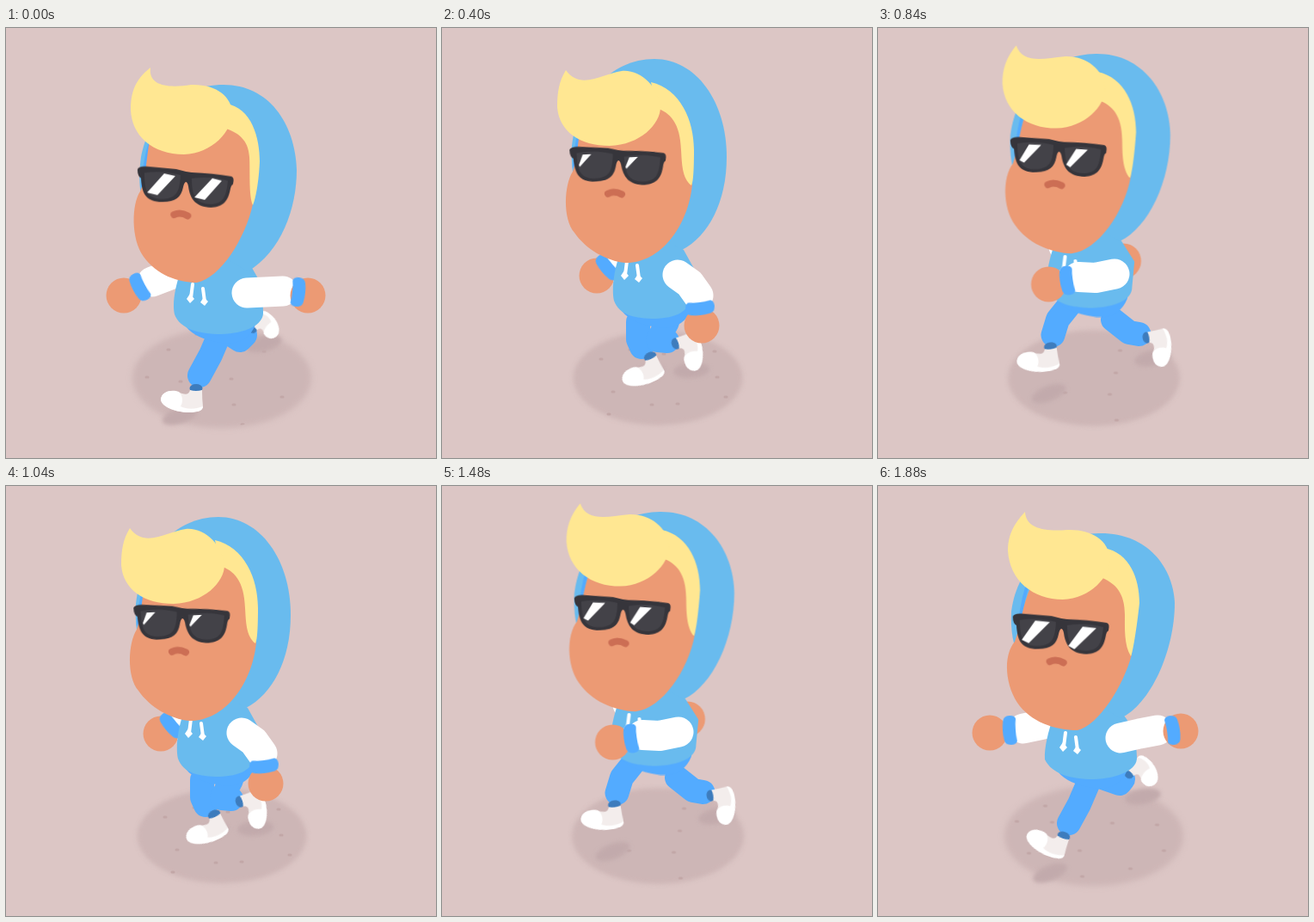
Write an HTML page without scripts that moves like this. It is 500 px wide and 500 px high and loops after 1.92 s.

```html
<!DOCTYPE html>
<html lang="en">
<head>
<meta charset="utf-8">
<title>Runner</title>
<style>
html, body { margin: 0; width: 100%; height: 100%; overflow: hidden; background: #dcc6c5; }
svg { display: block; width: 100vw; height: 100vh; }

/* A stride is two steps; poses advance at 25 per second. */
.stride { animation: .64s steps(2) infinite; }
.step { animation: .32s steps(2) infinite; }
.far .stride { animation-delay: -.32s; }

.hood, .torso { fill: #69bbee; }
.skin { fill: #ec9a74; }
.hair { fill: #ffe792; }
.blue { fill: #53abff; }
.white { fill: #fff; }
.line { fill: none; stroke-linecap: round; stroke-linejoin: round; }
.leg { stroke: #53abff; stroke-width: 28; animation-name: leg; }
.sleeve { stroke: #fff; stroke-width: 35; animation-name: sleeve; }
.shoe { animation-name: shoe; }
.cuff { animation-name: cuff; }
.hand { animation-name: hand; }
.shade { fill: #c2aaac; animation-name: shade; }

.dust { animation: dust .32s steps(8) infinite; }
.ground { transform-origin: 251px 407px; animation-name: ground; }
.body { animation-name: body; }
.head { animation-name: head; }
.torso { animation-name: torso; }
.strings { animation-name: strings; }
.hood { animation-name: hood; }
.face { animation-name: face; }
.side { animation-name: side; }
.quiff { animation-name: quiff; }
.features { transform-origin: 210px 180px; animation-name: features; }
.glint { animation-name: glint; }

@keyframes dust { to { transform: translate(220px, -128px); } }
@keyframes ground {
  0%, 100% { transform: scale(1); }
  25% { transform: scale(.945); }
  50% { transform: scale(.94); }
  75% { transform: scale(.98); animation-timing-function: steps(1); }
  87.5% { transform: scale(1); animation-timing-function: steps(1); }
}
@keyframes body {
  0%, 100% { transform: translate(0, 0); }
  25% { transform: translate(0, -18px); }
  50% { transform: translate(0, -33px); }
  75% { transform: translate(0, -28px); animation-timing-function: steps(1); }
  87.5% { transform: translate(0, -15px); animation-timing-function: steps(1); }
}
@keyframes head {
  0%, 100% { transform: translate(0, 0); }
  25% { transform: translate(-5px, -23px); }
  50% { transform: translate(-1px, -38px); }
  75% { transform: translate(4px, -32px); animation-timing-function: steps(1); }
  87.5% { transform: translate(5px, -14px); animation-timing-function: steps(1); }
}
@keyframes strings {
  0%, 100% { transform: translate(0, 0); }
  25% { transform: translate(-2px, -27px); }
  50% { transform: translate(0, -36px); }
  75% { transform: translate(1px, -28px); animation-timing-function: steps(1); }
  87.5% { transform: translate(1px, -11px); animation-timing-function: steps(1); }
}
@keyframes torso {
  0%, 100% { d: path("M203,283 C197,300 193,320 196,333 C202,350 225,356 250,356 C280,355 300,345 299,330 L298,300 L285,277 L240,250 Z"); }
  25% { d: path("M206,283 C200,300 197,322 200,335 C206,352 225,356 248,356 C272,355 286,348 287,335 L297,305 L281,276 L240,250 Z"); animation-timing-function: steps(5); }
  87.5% { d: path("M204,283 C198,300 193,320 194,333 C202,350 225,356 250,356 C280,355 302,345 301,330 L299,300 L284,279 L240,250 Z"); animation-timing-function: steps(1); }
}
@keyframes hood {
  0%, 100% { d: path("M281,283 C320,260 338,210 338,165 C336,110 305,66 253,66 C200,66 165,105 157,150 C153,180 156,200 165,215 Z"); }
  25% { d: path("M284,281 C315,265 336,225 336,173 C336,108 300,59 252,59 C200,59 162,105 156,160 C155,185 157,200 165,215 Z"); animation-timing-function: steps(5); }
  87.5% { d: path("M277,284 C312,268 340,205 340,150 C338,108 308,68 252,69 C200,70 157,105 150,160 C149,182 152,200 160,215 Z"); animation-timing-function: steps(1); }
}
@keyframes face {
  0%, 100% { d: path("M168,125 C163,150 163,175 156,190 C146,205 145,245 160,266 C175,287 200,296 222,296 C250,290 278,245 287,205 C291,160 289,125 256,110 Z"); }
  25% { d: path("M165,143 C163,160 161,178 157,190 C147,205 145,245 159,261 C172,280 196,294 218,296 C258,297 291,255 296,205 C297,150 288,122 252,110 Z"); animation-timing-function: steps(5); }
  87.5% { d: path("M173,130 C163,152 160,180 154,195 C141,210 142,243 157,266 C172,288 200,298 227,298 C252,292 281,245 290,210 C293,160 289,128 256,112 Z"); animation-timing-function: steps(1); }
}
@keyframes side {
  0%, 100% { d: path("M256,88 C286,93 295,128 295,155 C294,180 290,200 287,206 C282,195 284,165 283,150 C282,130 270,122 256,117 Z"); }
  25% { d: path("M248,86 C282,94 298,130 298,165 C298,190 297,203 295,206 C284,198 284,180 283,165 C282,133 270,121 254,116 Z"); animation-timing-function: steps(5); }
  87.5% { d: path("M258,86 C288,92 299,122 299,150 C296,179 291,209 289,212 C281,199 282,179 282,164 C282,139 272,128 256,121 Z"); animation-timing-function: steps(1); }
}
@keyframes quiff {
  0%, 100% { d: path("M168,46 C150,60 145,75 145,95 C146,125 170,147 207,147 C240,146 263,120 263,98 C262,80 245,65 215,66 C190,70 165,68 168,46 Z"); }
  25% { d: path("M149,72 C141,85 139,98 139,115 C141,143 165,160 200,160 C235,159 259,135 259,115 C257,92 236,71 214,73 C192,76 166,96 149,72 Z"); animation-timing-function: steps(5); }
  87.5% { d: path("M166,44 C152,59 146,72 146,89 C148,124 175,146 210,146 C242,145 265,119 265,99 C263,76 242,64 215,65 C190,67 167,64 166,44 Z"); animation-timing-function: steps(1); }
}
@keyframes features {
  0%, 100% { transform: rotate(-.5deg); }
  25% { transform: translate(1px, -2px) rotate(-3deg); animation-timing-function: steps(5); }
  87.5% { transform: translate(-1px, 1px) rotate(-1deg); animation-timing-function: steps(1); }
}
@keyframes glint {
  0%, 100% { d: path("M164,191 L184,169 L197,172 L176,194 Z M219,197 L240,175 L251,178 L231,200 Z"); }
  25% { d: path("M163,182 L168,170 L178,170 L164,184 Z M217,187 L222,176 L232,176 L218,189 Z"); animation-timing-function: steps(5); }
  87.5% { d: path("M163,191 L179,169 L196,171 L171,195 Z M217,199 L234,177 L250,179 L224,203 Z"); animation-timing-function: steps(1); }
}

@keyframes leg {
  0%, 100% { d: path("M250,352 L238,380 L225,404"); }
  12.5% { d: path("M252,354 L252,374 L256,383"); }
  25% { d: path("M266,340 L284,358 L297,364"); }
  37.5% { d: path("M280,338 L300,350 L310,348"); animation-timing-function: steps(1); }
  43.75% { d: path("M282,350 L305,358 L309,353"); animation-timing-function: steps(1); }
  50% { d: path("M279,364 L296,375 L302,369"); }
  62.5% { d: path("M262,342 L251,363 L262,364"); }
  75% { d: path("M254,325 L236,344 L238,360"); }
  87.5% { d: path("M248,332 L230,358 L217,378"); animation-timing-function: steps(1); }
  93.75% { d: path("M246,342 L234,370 L222,392"); animation-timing-function: steps(1); }
}
@keyframes shoe {
  0%, 100% { transform: translate(221px, 419px) rotate(0deg) scale(1); }
  12.5% { transform: translate(266px, 394px) rotate(-25deg) scale(1); }
  25% { transform: translate(306px, 372px) rotate(-75deg) scale(.93); }
  37.5% { transform: translate(319px, 348px) rotate(-125deg) scale(.85, 1); animation-timing-function: steps(1); }
  43.75% { transform: translate(316px, 347px) rotate(-138deg) scale(.74, 1); animation-timing-function: steps(1); }
  50% { transform: translate(311px, 362px) rotate(-142deg) scale(.66, .93); }
  62.5% { transform: translate(272px, 367px) rotate(-108deg) scale(.9, 1); }
  75% { transform: translate(237px, 372px) rotate(-35deg) scale(1); }
  87.5% { transform: translate(212px, 393px) rotate(20deg) scale(1); animation-timing-function: steps(1); }
  93.75% { transform: translate(216px, 407px) rotate(19deg) scale(1); animation-timing-function: steps(1); }
}
@keyframes shade {
  0%, 100% { transform: translate(202px, 451px) rotate(-18deg); }
  12.5% { transform: translate(262px, 414px) rotate(-15deg); }
  25% { transform: translate(306px, 392px) rotate(-10deg); }
  37.5% { transform: translate(332px, 376px) rotate(-10deg); animation-timing-function: steps(1); }
  43.75% { transform: translate(332px, 373px) rotate(-10deg); animation-timing-function: steps(1); }
  50% { transform: translate(324px, 379px) rotate(-15deg); }
  62.5% { transform: translate(290px, 398px) rotate(-5deg); }
  75% { transform: translate(242px, 426px) rotate(-20deg); }
  87.5% { transform: translate(203px, 448px) rotate(-22deg); animation-timing-function: steps(1); }
  93.75% { transform: translate(200px, 450px) rotate(-22deg); animation-timing-function: steps(1); }
}
@keyframes sleeve {
  0%, 100% { d: path("M280,308 L301,307 L322,306"); }
  12.5% { d: path("M287,291 L279,306 L268,303"); }
  25% { d: path("M278,287 L256,293 L238,291"); }
  37.5% { d: path("M272,285 L250,288 L228,288"); animation-timing-function: steps(1); }
  43.75% { d: path("M272,297 L250,302 L231,306"); animation-timing-function: steps(1); }
  50% { d: path("M272,303 L250,312 L232,319"); }
  62.5% { d: path("M274,287 L288,297 L298,311"); }
  75% { d: path("M276,275 L298,284 L313,292"); }
  87.5% { d: path("M280,281 L303,276 L322,272"); animation-timing-function: steps(1); }
  93.75% { d: path("M282,293 L304,288 L325,284"); animation-timing-function: steps(1); }
}
@keyframes cuff {
  0%, 100% { transform: translate(339px, 307px) rotate(6deg); }
  12.5% { transform: translate(255px, 302px) rotate(140deg); }
  25% { transform: translate(226px, 296px) rotate(165deg); }
  37.5% { transform: translate(215px, 291px) rotate(178deg); animation-timing-function: steps(1); }
  43.75% { transform: translate(216px, 308px) rotate(176deg); animation-timing-function: steps(1); }
  50% { transform: translate(218px, 325px) rotate(152deg); }
  62.5% { transform: translate(300px, 325px) rotate(83deg); }
  75% { transform: translate(326px, 302px) rotate(32deg); }
  87.5% { transform: translate(339px, 270px) rotate(-9deg); animation-timing-function: steps(1); }
  93.75% { transform: translate(342px, 284px) rotate(-9deg); animation-timing-function: steps(1); }
}
@keyframes hand {
  0%, 100% { transform: translate(351px, 311px); }
  12.5% { transform: translate(242px, 312px); }
  25% { transform: translate(206px, 303px); }
  37.5% { transform: translate(191px, 293px); animation-timing-function: steps(1); }
  43.75% { transform: translate(192px, 311px); animation-timing-function: steps(1); }
  50% { transform: translate(199px, 335px); }
  62.5% { transform: translate(302px, 346px); }
  75% { transform: translate(343px, 318px); }
  87.5% { transform: translate(352px, 272px); animation-timing-function: steps(1); }
  93.75% { transform: translate(352px, 285px); animation-timing-function: steps(1); }
}
</style>
</head>
<body>
<svg viewBox="0 0 500 500">
  <defs>
    <filter id="soft" x="-20%" y="-20%" width="140%" height="140%"><feGaussianBlur stdDeviation="3"/></filter>
    <filter id="blur" x="-40%" y="-60%" width="180%" height="220%"><feGaussianBlur stdDeviation="2"/></filter>
    <clipPath id="area"><ellipse cx="251" cy="407" rx="101" ry="56"/></clipPath>
    <path id="grains" fill="none" stroke="#c2a7a7" stroke-width="3" stroke-linecap="round" d="M163,406h2 M188,374h2 M202,411h2 M261,408h2 M264,438h2 M274,461h2 M320,429h2 M299,376h2 M229,375h2 M221,356h2 M351,378h2 M359,408h2 M129,417h2 M143,455h2 M188,470h2 M218,469h2 M138,481h2"/>
    <path id="band" d="M-7,-13 Q-6,-17 0,-17 Q7,-17 8,-11 Q10,0 8,11 Q7,17 0,17 Q-6,17 -7,13 Q-5,0 -7,-13 Z"/>
    <g id="sneaker">
      <ellipse rx="7.5" ry="5" fill="#3d7cbd"/>
      <path fill="#f3edec" d="M-7,2 Q0,4 7,2 Q7,12 8,21 C8,26 0,28 -10,28 C-28,27 -41,20 -41,13 C-40,2 -26,2 -19,5 C-12,8 -8,7 -7,2 Z"/>
      <path class="white" d="M-20,4 C-28,1 -40,3 -41,13 C-40,21 -24,28 -8,28 C2,28 8,26 8,21 C0,24 -10,25 -18,21 C-15,16 -15,9 -20,4 Z"/>
    </g>
  </defs>

  <g class="step ground">
    <ellipse cx="251" cy="407" rx="104" ry="58" fill="#cdb6b6" filter="url(#soft)"/>
  </g>
  <g clip-path="url(#area)">
    <g class="dust">
      <use href="#grains"/>
      <use href="#grains" x="-220" y="128"/>
    </g>
  </g>
  <g class="far" transform="translate(-24 -12)"><g class="stride shade"><ellipse rx="21" ry="9" filter="url(#blur)"/></g></g>
  <g class="stride shade"><ellipse rx="21" ry="9" filter="url(#blur)"/></g>

  <g class="far" transform="translate(-62 -24)">
    <path class="line stride sleeve" d="M280,308 L301,307 L322,306"/>
    <circle class="stride hand skin" r="20.5"/>
    <g class="stride cuff blue"><use href="#band"/></g>
  </g>
  <g class="far" transform="translate(-24 -12)">
    <path class="line stride leg" d="M250,352 L238,380 L225,404"/>
    <g class="stride shoe"><use href="#sneaker"/></g>
  </g>
  <path class="line stride leg" d="M250,352 L238,380 L225,404"/>
  <g class="stride shoe"><use href="#sneaker"/></g>

  <g class="step body">
    <path class="blue" d="M206,335 L209,347 Q221,362 250,366 Q280,370 290,345 L290,330 Z"/>
    <path class="step torso" d="M203,283 C197,300 193,320 196,333 C202,350 225,356 250,356 C280,355 300,345 299,330 L298,300 L285,277 L240,250 Z"/>
  </g>
  <g class="step strings">
    <path class="line" stroke="#fff" stroke-width="4" d="M217,298 L215,314 M229,303 L231,318"/>
    <path class="white" d="M214,309 L219,315 L214,320 L210,315 Z M230,313 L235,318 L231,323 L226,319 Z"/>
  </g>

  <path class="line stride sleeve" d="M280,308 L301,307 L322,306"/>
  <circle class="stride hand skin" r="20.5"/>
  <g class="stride cuff blue"><use href="#band"/></g>

  <g class="step head">
    <path class="step hood" d="M281,283 C320,260 338,210 338,165 C336,110 305,66 253,66 C200,66 165,105 157,150 C153,180 156,200 165,215 Z"/>
    <path class="line" stroke="#53abff" stroke-width="4" d="M168,132 Q161,155 159,184"/>
    <path class="step face skin" d="M168,125 C163,150 163,175 156,190 C146,205 145,245 160,266 C175,287 200,296 222,296 C250,290 278,245 287,205 C291,160 289,125 256,110 Z"/>
    <path class="step side hair" d="M256,88 C286,93 295,128 295,155 C294,180 290,200 287,206 C282,195 284,165 283,150 C282,130 270,122 256,117 Z"/>
    <path class="step quiff hair" d="M168,46 C150,60 145,75 145,95 C146,125 170,147 207,147 C240,146 263,120 263,98 C262,80 245,65 215,66 C190,70 165,68 168,46 Z"/>
    <g class="step features">
      <path class="line" stroke="#cc6e54" stroke-width="8" d="M195,217 Q203,213.500 211,218.500"/>
      <path fill="#36353b" d="M153,164 Q154,160 163,160.500 L198,164 Q208,167 216,168 Q240,169 262,173 Q266,174 264,182 Q261,184 261,187 C258,202 253,208 238,209 C221,208 214,200 212,184 Q211,179 209,179 Q207,180 206,185 C203,198 196,203 178,202 C162,200 158,192 157,174 Q153,172 153,164 Z"/>
      <path fill="#434248" d="M161,168 Q182,165 203,171 C202,192 197,199 179,198.500 C164,197 161,189 161,168 Z M216,175 Q238,172 258,178 C256,199 251,205 237,205 C220,204 216,195 216,175 Z"/>
      <path class="step glint white" d="M164,191 L184,169 L197,172 L176,194 Z M219,197 L240,175 L251,178 L231,200 Z"/>
    </g>
  </g>
</svg>
</body>
</html>
```
